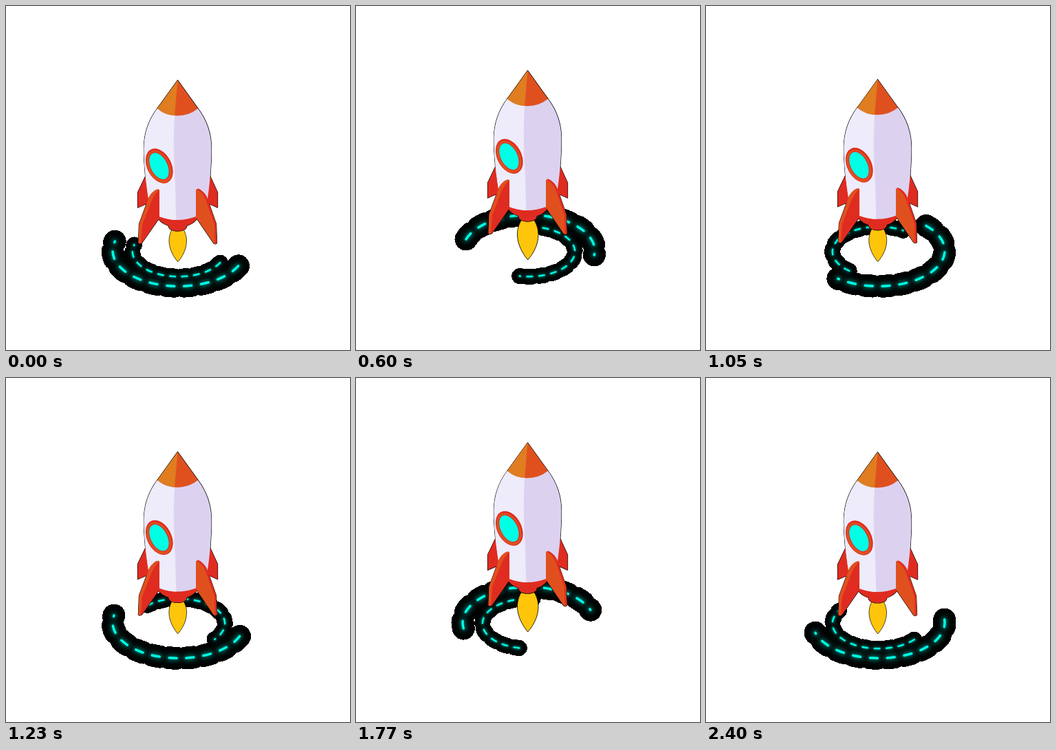
An HTML page that plays this animation: 500 px wide and 500 px high, repeating every 2430 ms.

```html
<!DOCTYPE html>
<html lang="en">
<head>
<meta charset="utf-8">
<title>Rocket</title>
<style>
  html, body { margin: 0; width: 100%; height: 100%; overflow: hidden; background: #fff; }
  svg { display: block; width: 100vw; height: 100vh; }
  .ring { fill: none; stroke-linecap: round; }
  .halo { stroke: #000; stroke-width: 33; shape-rendering: crispEdges; }
  .haze { stroke: #00ffe5; stroke-width: 12; opacity: .16; filter: blur(5px); }
  .glow { stroke: #00ffe5; stroke-width: 6; opacity: .36; filter: blur(2.5px); }
  .dash { stroke: #00ffe5; stroke-width: 3.5; }
  .edge { fill: #000; stroke: #000; stroke-width: 1.3; stroke-linejoin: round; }
  .red { fill: #e02c20; }
  .orange { fill: #e0501f; }
  .gold { fill: #df7d20; }
  .light { fill: #eeebfa; }
  .shade { fill: #dcd2f0; }
  .cyan { fill: #00ffe5; }
  .fire { fill: #fec50a; stroke: #000; stroke-width: .7; }
</style>
</head>
<body>
<svg viewBox="0 0 500 500">
  <defs>
    <path id="nose" d="M249.5 108 L279 149 Q266 159.500 249 159.500 Q232 159.500 220 149 Z"/>
    <path id="body" d="M220 149 C208 165 200.500 185 200.500 207 C200.500 233 204 262 208 286 L223 306 Q249 316 276 306 L292 286 C296 262 298.500 233 298.500 207 C298.500 185 291 165 279 149 Z"/>
    <path id="finL" d="M223 267 Q219 265 214 270 Q208 275 206 283 L193.500 317 L192.500 344.500 Q194.500 346.500 197.500 344.500 L223 308 Z"/>
    <path id="finR" d="M276 267 Q280 264 285 269 Q291 274 293 281 L305.500 317 L306.500 344.500 Q304.500 347 301.500 344.500 L276 307 Z"/>
    <path id="backL" d="M203 247 L191.500 271 V293 L210 285 Z"/>
    <path id="backR" d="M296.500 247 L307.500 271 V293 L290 285 Z"/>
    <path id="base" d="M222 304 H277 V310 Q271 317 263 319 Q262 327 249.500 327 Q237 327 236 319 Q228 317 222 310 Z"/>
    <clipPath id="left"><path d="M190 100 H249.500 V108 L245 160 Q242 208 246 260 L247.500 320 H190 Z"/></clipPath>
  </defs>
  <g id="rings"></g>
  <g id="rocket">
    <path id="flame" class="fire" d="M249.700 317 C242 320 237 331 237 341 C237 354 244 365 249.700 372 C256 365 262.500 354 262.500 341 C262.500 331 257 320 249.700 317 Z"/>
    <g class="edge">
      <use href="#backL"/><use href="#backR"/><use href="#base"/><use href="#body"/>
      <use href="#nose"/><use href="#finL"/><use href="#finR"/>
    </g>
    <g class="red"><use href="#backL"/><use href="#backR"/><use href="#base"/></g>
    <use href="#body" class="shade"/>
    <use href="#body" class="light" clip-path="url(#left)"/>
    <use href="#nose" class="orange"/>
    <use href="#nose" class="gold" clip-path="url(#left)"/>
    <g transform="translate(222.800 232.500) rotate(-27)">
      <ellipse class="red" rx="17.700" ry="26.800"/>
      <ellipse class="orange" cx="-.8" cy=".6" rx="16" ry="25"/>
      <ellipse class="red" cx="-.2" rx="13.200" ry="21.800"/>
      <ellipse class="cyan" cx="-.4" rx="12" ry="20.700"/>
    </g>
    <use href="#finL" class="red"/>
    <path class="orange" d="M223 267 Q219 265 214 270 Q208 275 206 283 L193.500 317 L192.500 344.500 L196 345 L198 318 L211 285 Q215 274 223 267 Z"/>
    <use href="#finR" class="orange"/>
    <path class="red" d="M277 266 Q280 264 285 269 Q291 274 293 281 L305.500 317 L306.500 344.500 L303.500 346 L303 318 L290 281 Q286 271 277 266 Z"/>
  </g>
</svg>
<script>
  const LOOP = 2430, STEP = 30;
  const HALF_BOB = 607, RISE = 14;
  const LENGTH = 475, DASH = 11, PITCH = 25, COUNT = 9, LAST = 1.5;

  // start and speed in path units; the second ring is a smaller copy
  const rings = [
    { y: 355.5, scale: 1, start: 25, speed: .3835 },
    { y: 357, scale: .7, start: 26, speed: .6003 }
  ];
  const pattern = [
    ...Array(COUNT).fill(`${DASH} ${PITCH - DASH}`),
    LAST, LENGTH - COUNT * PITCH - LAST
  ].join(' ');

  const byId = id => document.getElementById(id);
  const rocket = byId('rocket'), flame = byId('flame');

  byId('rings').innerHTML = ['halo', 'haze', 'glow', 'dash'].map(layer =>
    rings.map(r => `<ellipse class="ring ${layer}" rx="96" ry="51.800" pathLength="${LENGTH}"
      stroke-dasharray="${pattern}" transform="translate(251 ${r.y}) scale(${r.scale})"/>`).join('')
  ).join('');
  const arcs = [...document.querySelectorAll('.ring')];

  // rises, then falls, each half easing out
  function bob(t) {
    const half = t / HALF_BOB;
    const eased = Math.sin(half % 1 * Math.PI / 2);
    return Math.floor(half) % 2 ? 1 - eased : eased;
  }

  function draw(t) {
    arcs.forEach((arc, i) => {
      const { start, speed } = rings[i % rings.length];
      arc.setAttribute('stroke-dashoffset', -((start + speed * t) % LENGTH));
    });
    const lift = bob(t);
    rocket.setAttribute('transform', `translate(0 ${-RISE * lift})`);
    flame.setAttribute('transform',
      `translate(249.7 317) scale(${1 + .2 * lift}) translate(-249.7 -317)`);
  }

  const origin = performance.now();
  function tick(now) {
    const t = Math.max(0, now - origin) % LOOP;
    draw(Math.floor(t / STEP) * STEP);
    requestAnimationFrame(tick);
  }
  draw(0);
  requestAnimationFrame(tick);
</script>
</body>
</html>
```
